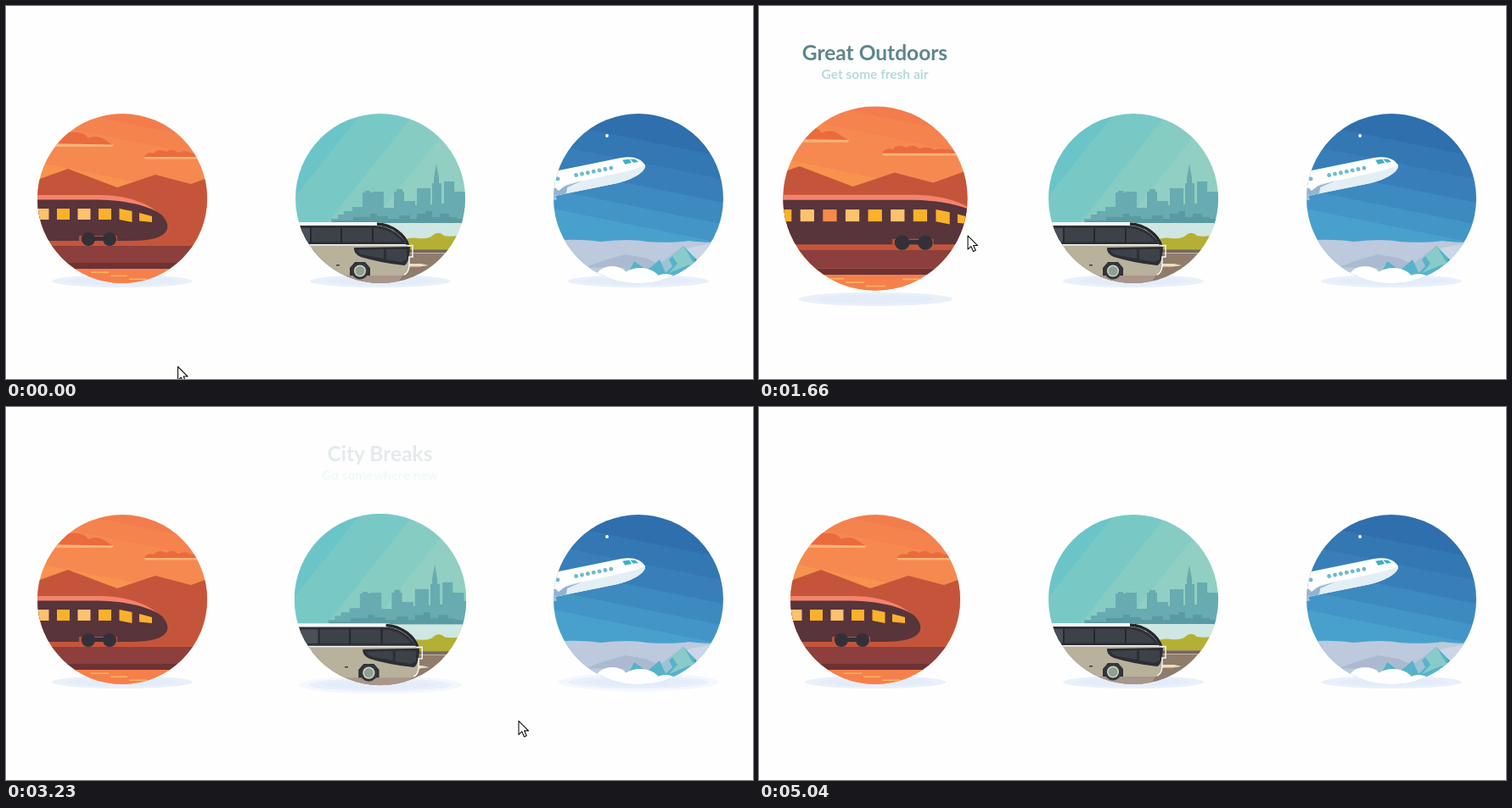
An HTML page that plays this animation: 880 px wide and 440 px high, repeating every 5.48 s.

```html
<!DOCTYPE html>
<html lang="en">
<head>
<meta charset="utf-8">
<title>Travel cards</title>
<style>
  html, body { margin: 0; width: 100%; height: 100%; overflow: hidden; background: #fefefe; }
  svg { display: block; }
  text { font-family: Lato, sans-serif; font-weight: 700; text-anchor: middle; }
  .title { font-size: 24.5px; fill: #45737a; }
  .sub { font-size: 15.5px; fill: #abd4d6; }
  .ink { fill: #fff; stroke: #111; stroke-width: 1.1; stroke-linejoin: round; }
</style>
</head>
<body>
<svg id="stage" width="880" height="440" viewBox="0 0 880 440">
  <defs>
    <clipPath id="disc"><circle r="100"/></clipPath>
  </defs>

  <g class="scene">
    <rect class="sky" x="-100" y="-100" width="200" height="200" fill="url(#sky0)"/>
    <g data-shift="-21">
      <path fill="#ea6b3d" d="M-100-64Q-76-78-62-78Q-45-80-40-71Q-30-76-20-69L-11-63ZM25-48Q29-56 37-53Q42-60 52-55Q58-60 66-54Q75-58 82-53Q92-56 125-48Z"/>
      <path fill="#fcb478" d="M-100-65L-10-63.500L-12-61H-100ZM25-49H125V-46.500H27Z"/>
      <path fill="#c5553a" d="M-110-18L-100-22L-64-35L-6-13L39-28L81-17L125-33V60H-110Z"/>
    </g>
    <rect x="-100" y="56" width="200" height="20" fill="#8c3f3c"/>
    <rect x="-100" y="76" width="200" height="7" fill="#6d3236"/>
    <rect x="-100" y="83" width="200" height="20" fill="#f6804b"/>
    <g data-shift="-21" fill="#fcb45c">
      <path d="M-37 86.500h21v1.500h-21zM-14 90.500h20v1.500h-20zM8 94.500h21v1.500H8zM48 87h18v1.500H48z"/>
    </g>
    <g data-shift="80">
      <path fill="#f4836b" d="M-300-4H-25C12-3 36 8 49 24L40 30L-300 4Z"/>
      <path fill="#58343b" d="M-300 1.500H-28C4 2 34 9 47 20Q56 30 52 38Q46 50 10 50H-300Z"/>
      <path fill="#b5503d" d="M-51 44H-6V50H-51Z"/>
      <path fill="#34303a" d="M-48 45H-9V50H-48Z"/>
      <circle cx="-40" cy="48" r="8" fill="#34303a"/>
      <circle cx="-15" cy="48" r="8" fill="#34303a"/>
      <g id="windows"></g>
      <path fill="#fcb12a" d="M-3.500 12L11.500 15V28L-3.500 25ZM20 17L35 21V28L20 26.500Z"/>
    </g>
  </g>

  <g class="scene">
    <rect x="-100" y="-100" width="200" height="200" fill="url(#sky1)"/>
    <g data-shift="-21">
      <path fill="#68abb0" d="M-58 30V24H-50V19H-43V15H-33V10H-21V-7H-18V-9H-12V-7H-9V-8H4V11H16V-8H19V-11H26V-8H28V3H41V8H43V-12H59V7H61V-18H63V-24L66-41L69-24V-18H72V6H75V-20H87V-8H100V2H112V-14H130V30Z"/>
      <path fill="#5a9ba2" d="M-56 30V26H-32V22H-12V18H-4V21H9V24H22V20H35V24H43V18H53V15H61V22H70V18H81V22H90V24H130V30Z"/>
    </g>
    <rect x="-100" y="29" width="200" height="32" fill="#cfe7e2"/>
    <path fill="#b4b033" d="M20 52Q34 45 45 47Q54 48 60 45Q68 37 75 44Q86 46 100 42V61H20Z"/>
    <rect x="-100" y="60" width="200" height="40" fill="#907c6b"/>
    <rect x="-100" y="61" width="200" height="3" fill="#746860"/>
    <rect x="-100" y="64" width="200" height="1" fill="#c6b79f"/>
    <path fill="#ecdfc2" d="M28 77H48L57 79L46 80.500H28Z"/>
    <g data-shift="80">
      <path fill="#aa968b" d="M-300 88H28L20 101H-300Z"/>
      <path fill="#f6f8f8" d="M-300 28H-4C14 29 32 42 35 57L-300 60ZM-300 23H-130V30H-300Z"/>
      <path fill="#2d3036" d="M-300 32H-6C10 32 27 43 32 57L-300 54Z"/>
      <path fill="#b8b19b" d="M-300 55H34V80Q33 91 26 91H-300Z"/>
      <path fill="#f6f8f8" d="M-300 54H34V55.500H-300Z"/>
      <path fill="#3d4249" d="M-300 35H-10V51H-300ZM-8 35C7 35 20 43 25 51H-8Z"/>
      <path fill="#4b5057" d="M-116 35H-82V51H-116Z"/>
      <path stroke="#25282d" stroke-width="2" d="M-153 34v18m36-18v18m35-18v18m36-18v18m37-18v18"/>
      <path fill="none" stroke="#25282d" stroke-width="3.500" d="M-4 30C14 31 29 43 33 56"/>
      <path fill="#2b2e34" d="M-31 58Q-32 65-23 69Q0 76 28 79Q34 77 35 57Z"/>
      <path fill="#3d4249" d="M-27 61Q-26 66-18 67L4 71V60ZM7 60H31V72L25 75L7 72Z"/>
      <path fill="none" stroke="#fafaf5" stroke-width="1.400" d="M31 55.500H38V69H34V80Q33 88 28 90"/>
      <path fill="#3d3f3e" d="M-52 78h4v1.500h-4zM-80 78h4v1.500h-4zM-110 78h4v1.500h-4z"/>
      <g id="wheel">
        <path fill="#2f3237" d="M-36 91V82L-30 75H-18L-12 82V91Z"/>
        <circle cx="-24" cy="85.500" r="10" fill="#34373b"/>
        <circle cx="-24" cy="85.500" r="7" fill="#d2d6c8"/>
        <circle cx="-24" cy="85.500" r="5.500" fill="#8fa091"/>
      </g>
      <use href="#wheel" x="-110"/>
    </g>
  </g>

  <g class="scene">
    <rect x="-100" y="-100" width="200" height="200" fill="url(#sky2)"/>
    <g data-shift="-21">
      <circle cx="-37" cy="-74" r="1.900" fill="#fff"/>
      <path fill="#bdc9dd" d="M-110 50Q-70 47-45 51Q-10 47 10 51Q40 53 60 50Q85 54 130 49V101H-110Z"/>
      <path fill="#cbd6e7" d="M55 60Q80 52 130 50V75H60Z"/>
    </g>
    <g data-shift="-40">
      <path fill="#abbad1" d="M-62 81L-40 73L-16 66L8 70L40 84Z"/>
      <path fill="#a0c2d5" d="M53 56L4 93H45ZM-5 74L-26 92H-2ZM118 58L84 92H112Z"/>
      <path fill="#57b3ca" d="M53 56L36 72L40 80L24 96H92ZM-5 74L-14 92H20ZM25 72L2 92H34Z"/>
      <path fill="#88cbc9" d="M53 56L40 68L46 77L36 88L60 78L70 84Z"/>
      <path fill="#3a97bb" d="M118 58L104 76L100 96H150ZM66 70L70 96H92Z"/>
    </g>
    <g data-shift="80">
      <g transform="translate(8 -39) rotate(-11.500)">
        <path fill="#fff" d="M0 0C-3-9-12-14-26-14.500H-240V14H-40C-20 14-1 8 0 0Z"/>
        <path fill="#e4eef5" d="M0 0C-20 4-40 3-240 3V14H-40C-20 14-1 8 0 0Z"/>
        <path fill="#92b3d3" d="M-76 3L-95 7L-98 14H-240V5H-98Z"/>
        <path fill="#fff" d="M-90 1L-110 3L-106 9Z"/>
        <path fill="#8dadd0" d="M-148-7L-145 15L-168 18Z"/>
        <path fill="#a5c2dd" d="M-140 7H-112L-110 19H-138Z"/>
        <path fill="#41afc5" d="M-25-11.500L-17-11L-15-6H-23ZM-16-11L-10-9.500L-7-5.500L-13-6Z"/>
        <g id="portholes" fill="#6dbccb"></g>
      </g>
    </g>
    <g data-shift="-40" fill="#fff">
      <rect x="-80" y="92" width="240" height="12"/>
      <ellipse cx="-31" cy="97" rx="21" ry="17"/>
      <ellipse cx="2" cy="98" rx="24" ry="16"/>
      <ellipse cx="32" cy="101" rx="17" ry="12"/>
      <ellipse cx="66" cy="99" rx="19" ry="13"/>
      <ellipse cx="110" cy="97" rx="32" ry="24"/>
    </g>
  </g>

  <path id="arrow" class="ink" d="M0.500 0.500V16.500L4.300 13L7 19L9.700 17.800L7.100 12H12Z"/>
  <path id="hand" class="ink" d="M-1.700 1.500Q0-1 1.700 1.500V8Q4 6.500 5 8.500Q7.300 7.500 8.200 9.500Q10.500 9 10.500 12V16Q10.300 19 8.500 20.500V23H-0.500V20.500L-5.500 13.500Q-6.500 11-4.500 10.500Q-3 10.500-1.700 13Z"/>
</svg>
<script>
const LOOP = 5480;
const stage = document.getElementById('stage');
const byId = id => document.getElementById(id);
const clamp = x => Math.max(0, Math.min(1, x));
const easeOut = x => 1 - (1 - clamp(x)) ** 2;
const smooth = x => x * x * (3 - 2 * x);

function add(parent, name, attrs, text = '') {
  const el = document.createElementNS('http://www.w3.org/2000/svg', name);
  for (const key in attrs) el.setAttribute(key, attrs[key]);
  el.textContent = text;
  parent.append(el);
  return el;
}

// Each sky is a set of flat slanted bands: normal direction, then [colour, end] pairs.
const cards = [
  { x: 137, enter: 440, leave: 1640, title: 'Great Outdoors', sub: 'Get some fresh air',
    normal: [-20, 98], bands: [['#f37c4d', -88], ['#f5834e', -68], ['#f6894f', -22], ['#f7934e', 100]] },
  { x: 441, enter: 1777, leave: 3040, title: 'City Breaks', sub: 'Go somewhere new',
    normal: [78, 62], bands: [['#6bc5c8', -80], ['#78c9c6', -31], ['#86ccc3', 10], ['#90cfc2', 100]] },
  { x: 745, enter: 3380, leave: 4570, title: 'Cheap Flights', sub: 'Come fly with me',
    normal: [-20, 98], bands: [['#2f6fad', -68], ['#3377b3', -42], ['#387fb9', -15], ['#3c8abf', 10], ['#4295c6', 32], ['#48a1cc', 100]] }
];

const scenes = [...document.querySelectorAll('.scene')];
cards.forEach((card, i) => {
  const [nx, ny] = card.normal;
  const gradient = add(stage.querySelector('defs'), 'linearGradient',
    { id: 'sky' + i, gradientUnits: 'userSpaceOnUse', x1: -nx, y1: -ny, x2: nx, y2: ny });
  let start = 0;
  for (const [color, edge] of card.bands) {
    const end = (edge + 100) / 200;
    for (const offset of [start, end]) add(gradient, 'stop', { offset, 'stop-color': color });
    start = end;
  }

  const group = add(stage, 'g', {});
  card.shadow = add(group, 'g', {});
  card.halo = add(card.shadow, 'ellipse', { rx: 94.5, ry: 10.5, fill: '#f4f7fe' });
  add(card.shadow, 'ellipse', { rx: 83, ry: 7.5, fill: '#e9f0fa' });
  add(card.shadow, 'ellipse', { rx: 65, ry: 4.8, fill: '#e5ecf9' });
  card.disc = add(group, 'g', {});
  const clip = add(card.disc, 'g', { 'clip-path': 'url(#disc)' });
  clip.append(scenes[i]);
  card.layers = [...scenes[i].querySelectorAll('[data-shift]')];
  card.label = add(group, 'g', {});
  add(card.label, 'text', { class: 'title', x: card.x - .5, y: 63.5 }, card.title);
  add(card.label, 'text', { class: 'sub', x: card.x - .5, y: 86 }, card.sub);
});

['#fcb12a', '#fcc26e', '#fcb12a', '#fcc26e', '#f58a4b', '#fcc26e', '#fcb12a'].forEach((fill, i) =>
  add(byId('windows'), 'rect', { x: -28 - 24.5 * i, y: 12, width: 15, height: 13, fill }));

for (const [first, count] of [[-40, 7], [-104, 5], [-151, 4]])
  for (let i = 0; i < count; i++)
    add(byId('portholes'), 'circle', { cx: first - (count > 5 ? 7 : 6.3) * i, cy: -5, r: 2.4 });

// Pointer moves: start, end, from, to, downward bow.
const moves = [
  [400, 600, [202, 425], [152, 262], 0],
  [1500, 1900, [152, 262], [415, 286], 0],
  [1960, 2740, [415, 286], [416, 283], 0],
  [2820, 3600, [416, 283], [763, 297], 80],
  [4420, 4850, [763, 297], [785, 448], 0]
];
stage.append(byId('arrow'), byId('hand'));

function pointerAt(t) {
  const [start, end, from, to, bow] = moves.findLast(move => t >= move[0]) || moves[0];
  const u = smooth(clamp((t - start) / (end - start)));
  return [from[0] + (to[0] - from[0]) * u, from[1] + (to[1] - from[1]) * u + bow * Math.sin(Math.PI * u)];
}

function draw(t) {
  let hovering = false;
  cards.forEach((card, i) => {
    const back = 1 - easeOut((t - card.leave) / 300);
    const lift = easeOut((t - card.enter) / 250) * back;
    const travel = clamp((t - card.enter) / 1000) * back;
    const scale = 1 + .1 * lift;
    card.disc.setAttribute('transform', `translate(${card.x} 227) scale(${scale})`);
    card.shadow.setAttribute('transform', `translate(${card.x} ${324.5 + 24.5 * lift}) scale(${scale})`);
    card.halo.setAttribute('opacity', i > 0 && t >= 2740 && t < 3800 ? 1 : 0);
    card.label.setAttribute('opacity', lift);
    for (const layer of card.layers)
      layer.setAttribute('transform', `translate(${layer.dataset.shift * travel} 0)`);
    hovering ||= t >= card.enter && t < card.leave;
  });
  const place = `translate(${pointerAt(t).join(' ')})`;
  for (const [id, shown] of [['arrow', !hovering], ['hand', hovering]]) {
    byId(id).setAttribute('transform', place);
    byId(id).setAttribute('visibility', shown ? 'visible' : 'hidden');
  }
}

function tick() {
  draw(performance.now() % LOOP);
  requestAnimationFrame(tick);
}
tick();
</script>
</body>
</html>
```
